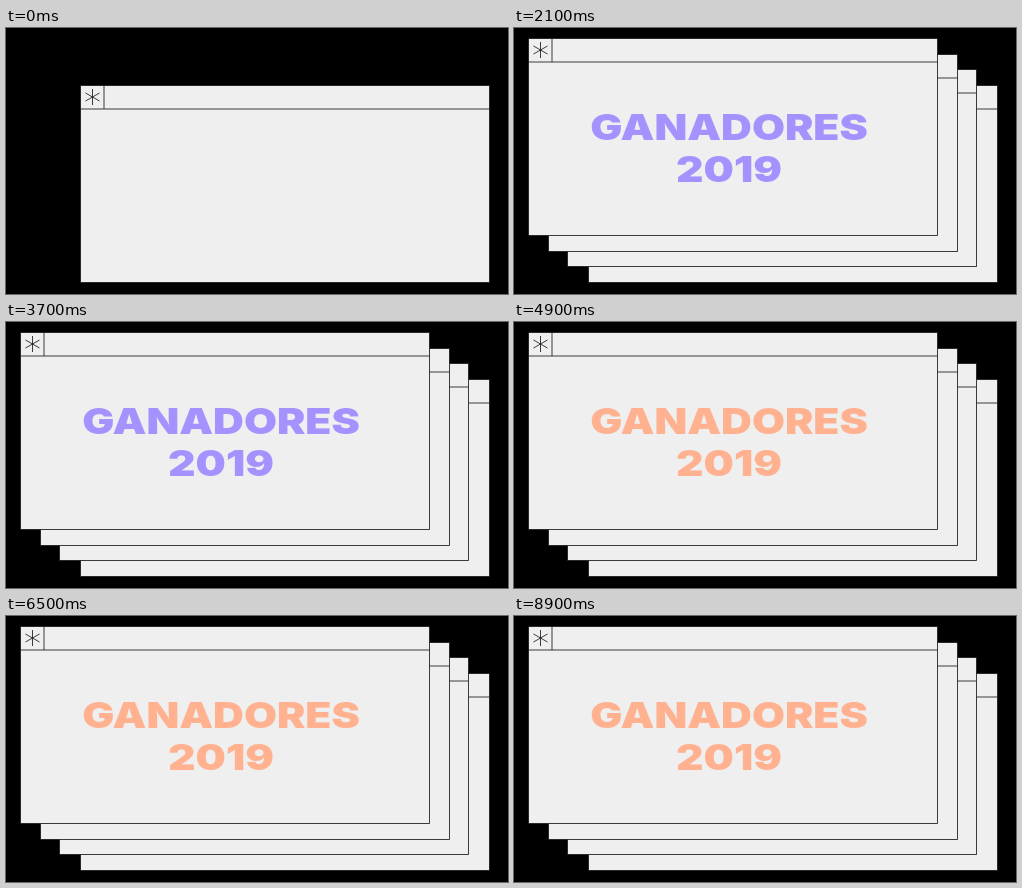
Animation, 502 px wide and 266 px high, one loop 9.1 s. Source, as an HTML page:

```html
<!DOCTYPE html>
<html lang="es">
<head>
<meta charset="utf-8">
<title>Ganadores 2019</title>
<style>
  html, body { margin: 0; width: 100%; height: 100%; overflow: hidden; background: #000; }
  svg { display: block; width: 502px; height: 266px; }
  .card { fill: #efefef; stroke: #1c1c1c; stroke-width: .85; }
  .title { font: 900 35.5px Inter, sans-serif; text-anchor: middle; }
</style>
</head>
<body>
<svg viewBox="0 0 502 266">
  <defs>
    <g id="card" class="card">
      <rect width="409" height="197"/>
      <path d="M0 23.5H409M23.5 0V23.5M12 3.5V19.5M5 7.5L19 15.5M5 15.5L19 7.5"/>
    </g>
  </defs>
  <use class="layer" href="#card" x="74.5" y="57.5"/>
  <use class="layer" href="#card" x="53.5" y="41.5" visibility="hidden"/>
  <use class="layer" href="#card" x="34.5" y="26.5" visibility="hidden"/>
  <use class="layer" href="#card" x="14.5" y="10.5" visibility="hidden"/>
  <!-- extended display style, shared by both lines -->
  <g id="title" class="title" transform="translate(215 0) scale(1.2 1)" visibility="hidden">
    <text y="112.3">GANADORES</text>
    <text y="153.8">2019</text>
  </g>
</svg>
<script>
  const LOOP = 9100, STEP = 200, LEAD = 100;
  const COLORS = ['#a692ff', '#ffb190'];
  const layers = [...document.querySelectorAll('.layer')];
  const title = document.getElementById('title');
  const show = (el, on) => el.setAttribute('visibility', on ? 'visible' : 'hidden');

  function draw(now) {
    const step = Math.floor((now % LOOP + LEAD) / STEP);
    layers.forEach((layer, i) => show(layer, i <= step));

    // the title flashes on every other step, alternating colours
    const beat = step - (layers.length - 1);
    show(title, beat >= 0 && beat % 2 === 0);
    title.setAttribute('fill', COLORS[Math.max(0, beat >> 1) % 2]);
  }

  const start = performance.now();
  function tick() {
    draw(performance.now() - start);
    requestAnimationFrame(tick);
  }
  tick();
</script>
</body>
</html>
```
